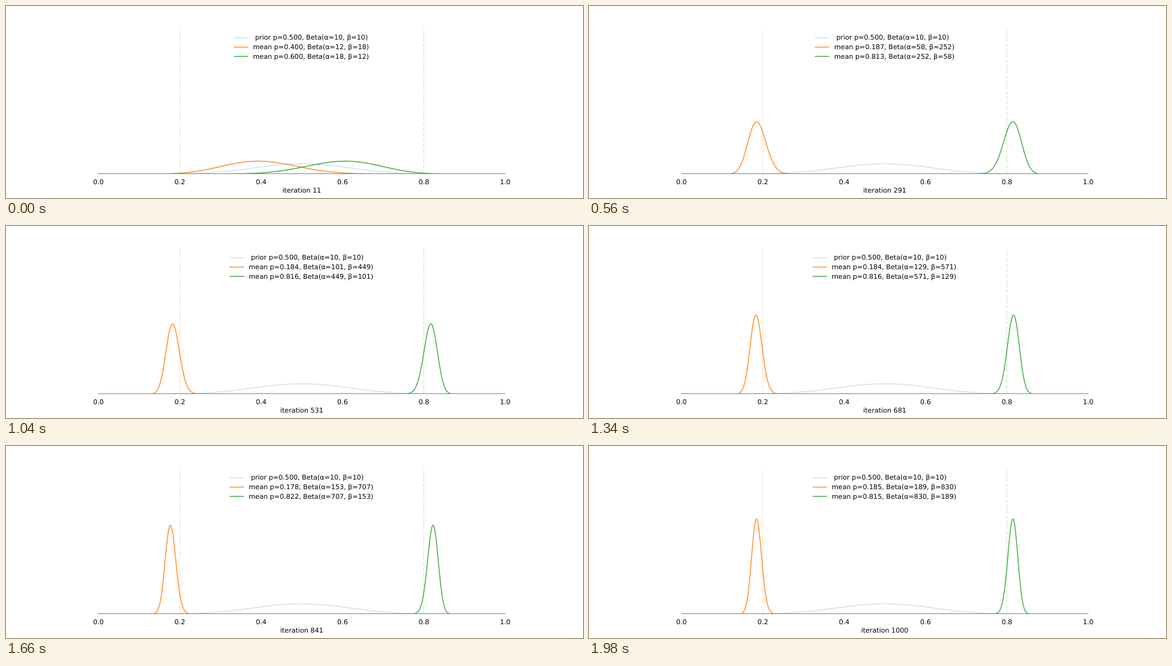
Animation, 960 px wide and 320 px high, one loop 2020 ms. Source, as an HTML page:

```html
<!DOCTYPE html>
<html lang="en">
<head>
<meta charset="utf-8">
<title>Beta posteriors</title>
<style>
  html, body { margin: 0; width: 100%; height: 100%; overflow: hidden; background: #fff; }
  svg { display: block; width: 960px; height: 320px; }
  text { font: 11.11px "DejaVu Sans", sans-serif; white-space: pre; text-rendering: geometricPrecision; }
  path, line { fill: none; stroke-width: 1.667; }
</style>
</head>
<body>
<svg id="stage" viewBox="0 0 960 320">
  <clipPath id="axes"><rect x="153.6" y="38.4" width="676.8" height="241.6"/></clipPath>
</svg>
<script>
const LEFT = 153.6, WIDTH = 676.8, BASE = 280, UNIT = 4.832, CENTER = 492;
const BLUE = '#1f77b4', ORANGE = '#ff7f0e', GREEN = '#2ca02c';
const FRAME = 20, LAST = 99, LOOP = 2020;
const DIGIT = 7.07;

// Known [trials, alpha] points of the random walk
const walk = [[30, 12], [150, 33], [310, 58], [550, 101], [700, 129], [860, 153], [1019, 189]];

const stage = document.getElementById('stage');
const toX = p => LEFT + p * WIDTH;

function add(tag, attrs, content = '') {
  const node = document.createElementNS('http://www.w3.org/2000/svg', tag);
  for (const key in attrs) node.setAttribute(key, attrs[key]);
  node.textContent = content;
  return stage.appendChild(node);
}

const logFact = [0];
for (let i = 1; i <= 1100; i++) logFact[i] = logFact[i - 1] + Math.log(i);

function betaPath(a, b) {
  const norm = logFact[a + b - 1] - logFact[a - 1] - logFact[b - 1];
  const steps = 600;
  let d = '';
  for (let i = 0; i <= steps; i++) {
    const p = i / steps;
    const pdf = Math.exp(norm + (a - 1) * Math.log(p) + (b - 1) * Math.log(1 - p));
    d += (i ? 'L' : 'M') + toX(p).toFixed(2) + ' ' + (BASE - pdf * UNIT).toFixed(2);
  }
  return d;
}

function alphaAt(trials) {
  let i = 1;
  while (walk[i][0] < trials) i++;
  const [n0, a0] = walk[i - 1], [n1, a1] = walk[i];
  return Math.round(a0 + (a1 - a0) * (trials - n0) / (n1 - n0));
}

function addMarker(x, color) {
  add('line', { x1: x, x2: x, y1: BASE, y2: 38.4, stroke: color, opacity: 0.2, 'stroke-dasharray': '6.17 2.67' });
}

function addSeries(color, opacity, handleY, textY) {
  return {
    curve: add('path', { stroke: color, opacity, 'clip-path': 'url(#axes)', 'stroke-linejoin': 'round' }),
    handle: add('line', { y1: handleY, y2: handleY, stroke: color, opacity, 'stroke-linecap': 'square' }),
    label: add('text', { y: textY })
  };
}

function setSeries(series, name, a, b) {
  series.curve.setAttribute('d', betaPath(a, b));
  series.label.textContent = `${name} p=${(a / (a + b)).toFixed(3)}, Beta(α=${a}, β=${b})`;
}

function placeLegend(series, x) {
  series.label.setAttribute('x', Math.round(x));
  series.handle.setAttribute('x1', x - 31.1);
  series.handle.setAttribute('x2', x - 8.9);
}

addMarker(289, ORANGE);
addMarker(695, GREEN);
const prior = addSeries(BLUE, 0.2, 53, 56);
const low = addSeries(ORANGE, 0.8, 68.5, 72);
const high = addSeries(GREEN, 0.8, 84, 88);
add('line', { x1: 153, x2: 831, y1: 279.5, y2: 279.5, stroke: '#808080', style: 'stroke-width:1' });
for (let i = 0; i <= 5; i++) {
  add('text', { x: toX(i / 5) + 0.2, y: 297, 'text-anchor': 'middle' }, (i / 5).toFixed(1));
}
const counter = add('text', { x: CENTER, y: 311, 'text-anchor': 'middle' });
setSeries(prior, ' prior', 10, 10);

let shown = -1;
function draw(time) {
  const step = Math.min(LAST, Math.floor((time % LOOP) / FRAME));
  if (step === shown) return;
  shown = step;
  const iteration = Math.min(1000, 11 + 10 * step);
  const trials = iteration + 19;
  const a = alphaAt(trials), b = trials - a;
  setSeries(low, 'mean', a, b);
  setSeries(high, 'mean', b, a);
  const extraDigits = `${a}${b}`.length - 4;
  const x = 411.1 - extraDigits * DIGIT / 2;
  for (const series of [prior, low, high]) placeLegend(series, x);
  counter.textContent = `iteration ${iteration}`;
}

const start = performance.now();
function tick() {
  draw(performance.now() - start);
  requestAnimationFrame(tick);
}
tick();
</script>
</body>
</html>
```
